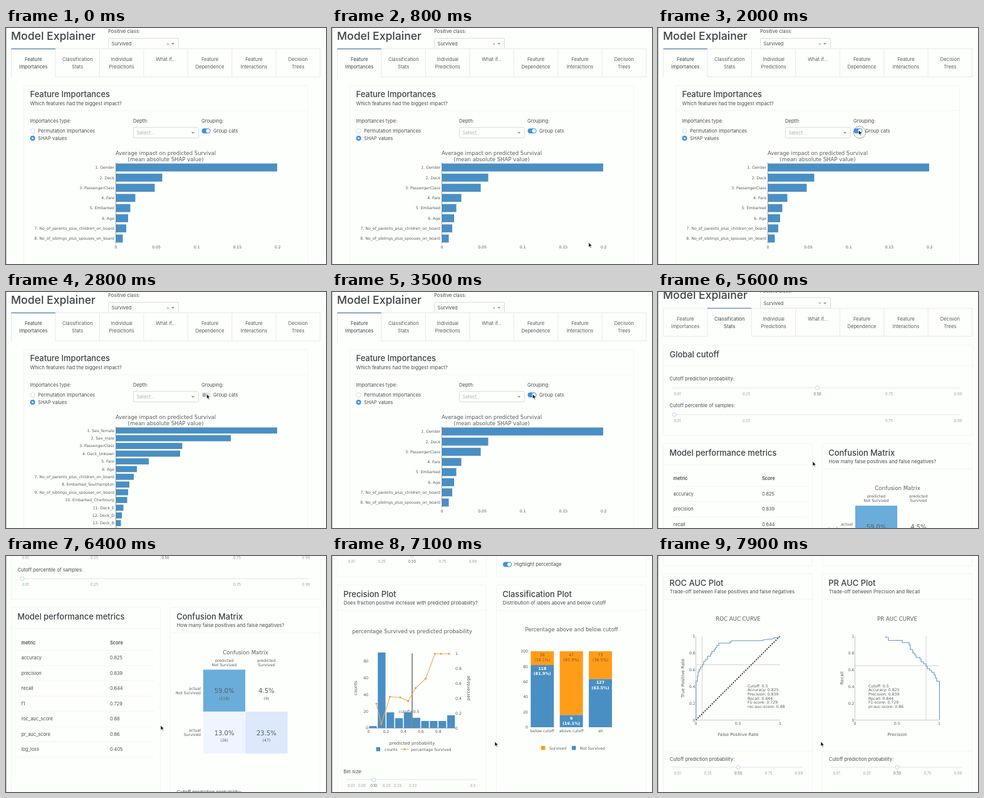
These frames come from a looping animation (511 by 379 pixels, 8 s). An HTML page:

```html
<!DOCTYPE html>
<html lang="en">
<head>
<meta charset="utf-8">
<title>Model Explainer</title>
<style>
html, body { margin: 0; width: 100%; height: 100%; overflow: hidden; background: #fdfffc; }
svg { display: block; width: 511px; height: 379px; }
text { font: 7.65px Inter, sans-serif; fill: #4a4d50; white-space: pre; }
.plot { font-family: "DejaVu Sans", sans-serif; fill: #5a5d60; }
</style>
</head>
<body>
<svg id="stage" viewBox="0 0 511 379"></svg>
<script>
const BLUE = '#4a8fc3', ORANGE = '#ff9d18', ACCENT = '#3f92e4', LINE = '#f3f5f3', PAPER = '#fdfffc';
const AXIS = '#c3c6c5', CROSS = '#cbcecd', CURVE = '#6b93b8', INK = '#3d4044';
const DURATION = 8000;
const stage = document.getElementById('stage');

function el(parent, tag, attrs = {}) {
  const node = document.createElementNS('http://www.w3.org/2000/svg', tag);
  for (const key in attrs) node.setAttribute(key, attrs[key]);
  parent.appendChild(node);
  return node;
}
const group = (parent, dy = 0) => el(parent, 'g', { transform: `translate(0 ${dy})` });
const rect = (g, x, y, width, height, fill, more) => el(g, 'rect', { x, y, width, height, fill, ...more });
const path = (g, d, stroke, width = 1, more) =>
  el(g, 'path', { d, stroke, 'stroke-width': width, fill: 'none', ...more });
const hline = (g, x1, x2, y, stroke = LINE, width = 1) => path(g, `M${x1} ${y}H${x2}`, stroke, width);
const vline = (g, x, y1, y2, stroke = LINE, width = 1) => path(g, `M${x} ${y1}V${y2}`, stroke, width);
const circle = (g, cx, cy, r, fill, stroke = 'none') => el(g, 'circle', { cx, cy, r, fill, stroke });

// y is the visual middle of the line of text.
function text(g, x, y, content, { size = 7.65, anchor = 'start', weight = 400, fill, plot, turn } = {}) {
  const node = el(g, 'text', { x, y: y + size * 0.355, 'text-anchor': anchor });
  node.style.fontSize = size + 'px';
  node.style.fontWeight = weight;
  if (fill) node.style.fill = fill;
  if (plot) node.setAttribute('class', 'plot');
  if (turn) node.setAttribute('transform', `rotate(-90 ${x} ${y})`);
  node.textContent = content;
  return node;
}
const plotText = (g, x, y, content, size = 6.2, anchor = 'middle', more) =>
  text(g, x, y, content, { size, anchor, plot: true, ...more });
const heading = (g, x, y, content) => text(g, x, y, content, { size: 12.9, weight: 500, fill: INK });
const subheading = (g, x, y, content) => text(g, x, y, content, { size: 7.8 });

function card(g, x, y, width, height, headerHeight) {
  rect(g, x + .5, y + .5, width, height, PAPER, { stroke: LINE });
  if (headerHeight) hline(g, x, x + width, y + headerHeight + .5);
}

function titledCard(g, x, y, height, title, subtitle) {
  card(g, x, y, x < 100 ? 238 : 239, height, subtitle ? 41 : 34);
  heading(g, x + 10.3, y + 15.4, title);
  if (subtitle) subheading(g, x + 10.8, y + 29.7, subtitle);
}

function select(g, x, y, width, value, filled) {
  rect(g, x + .5, y + .5, width, 17, PAPER, { stroke: '#d9dcdb', rx: 2 });
  text(g, x + 5.5, y + 9.2, value, { fill: filled ? '#4a4d50' : '#b2b5b6' });
  if (filled) text(g, x + width - 19, y + 9, '×', { fill: '#999' });
  el(g, 'path', { d: `M${x + width - 11} ${y + 8}h5l-2.5 3z`, fill: '#999' });
}

function toggle(g, x, y) {
  const track = rect(g, x, y - 4, 14, 8, ACCENT, { rx: 4 });
  const knob = circle(g, x + 10, y, 3, '#fff');
  return on => {
    track.setAttribute('fill', on ? ACCENT : '#dfe3e6');
    knob.setAttribute('cx', x + (on ? 10 : 4));
    knob.setAttribute('fill', on ? '#fff' : '#a9afb4');
  };
}

function slider(g, x1, x2, y, knobX, marks) {
  hline(g, x1, x2, y, '#e8eeee', 1.4);
  for (const [x, label] of marks) {
    const active = Math.abs(x - knobX) < 2;
    text(g, x, y + 9.7, label, { size: 5.8, anchor: 'middle', fill: active ? '#666' : '#9b9e9f' });
  }
  circle(g, knobX, y, 3, PAPER, '#b3dceb');
}

function cutoffSlider(g, x, y) {
  text(g, x + 10.8, y, 'Cutoff prediction probability:');
  const labels = ['0.01', '0.25', '0.50', '0.75', '0.99'];
  slider(g, x + 14, x + 223, y + 13.2, x + 120,
    labels.map((label, i) => [x + 23.3 + i * 48.4, label]));
}

const tabs = ['Feature Importances', 'Classification Stats', 'Individual Predictions', 'What if...',
  'Feature Dependence', 'Feature Interactions', 'Decision Trees'];

function header(g, active) {
  text(g, 8, 12.5, 'Model Explainer', { size: 17.6, weight: 500, fill: INK });
  text(g, 163, 5.5, 'Positive class:');
  select(g, 163, 16, 112, 'Survived', true);
  const step = 70.45, edge = '#e6e9e7';
  rect(g, 8.5, 33.5, step * 7, 45, PAPER, { stroke: edge });
  tabs.forEach((name, i) => {
    const x = 8.5 + i * step;
    if (i) vline(g, x, 33.5, 78.5, edge);
    if (i === active) {
      hline(g, x, x + step, 33.5, '#5f87b8', 1.3);
      hline(g, x + .5, x + step - .5, 78.5, PAPER, 1.6);
    }
    const words = name === 'What if...' ? [name] : name.split(' ');
    words.forEach((word, k) => text(g, x + step / 2, 50.3 + k * 12, word,
      { anchor: 'middle', fill: i === active ? INK : '#5a5d60' }));
  });
}

function barChart(g, top, step, height, bars) {
  bars.forEach(([name, width], i) => {
    const y = top + i * step;
    rect(g, 175.5, y - height / 2, width, height, BLUE);
    plotText(g, 173, y, `${i + 1}. ${name}`, 6.2, 'end');
  });
}

// ---- Importances page
const importances = group(stage);
header(importances, 0);
card(importances, 28, 92, 453, 400, 40);
heading(importances, 38.5, 106, 'Feature Importances');
subheading(importances, 38.5, 121.7, 'Which features had the biggest impact?');
text(importances, 38.5, 149, 'Importances type:');
circle(importances, 42.5, 165.3, 3.6, PAPER, '#d9dcdb');
text(importances, 51, 165.3, 'Permutation Importances');
circle(importances, 42.5, 177, 4, ACCENT);
circle(importances, 42.5, 177, 1.5, '#fff');
text(importances, 51, 177, 'SHAP values');
text(importances, 203, 149, 'Depth:');
select(importances, 203, 159, 104, 'Select...', false);
text(importances, 312, 149, 'Grouping:');
const setGrouping = toggle(importances, 312.5, 165.3);
text(importances, 331, 165.3, 'Group cats');
plotText(importances, 255, 200.5, 'Average impact on predicted Survival', 8.5);
plotText(importances, 255, 211.3, '(mean absolute SHAP value)', 8.5);

const parents = 'No_of_parents_plus_children_on_board';
const siblings = 'No_of_siblings_plus_spouses_on_board';
const grouped = group(importances), ungrouped = group(importances);
barChart(grouped, 224, 16.3, 12.8, [['Gender', 257.5], ['Deck', 74], ['PassengerClass', 62], ['Fare', 31],
  ['Embarked', 23], ['Age', 19.5], [parents, 16.5], [siblings, 11]]);
vline(grouped, 175.5, 216, 346, '#777', .7);
['0', '0.05', '0.1', '0.15', '0.2'].forEach((label, i) => plotText(grouped, 175.5 + i * 64.6, 352, label));
barChart(ungrouped, 222.4, 12.4, 9.8, [['Sex_female', 257.5], ['Sex_male', 183.5], ['PassengerClass', 106],
  ['Deck_Unkown', 102.5], ['Fare', 52.5], ['Age', 33.5], [parents, 28.5], ['Embarked_Southampton', 21.5],
  [siblings, 19.5], ['Embarked_Cherbourg', 18], ['Deck_E', 12], ['Deck_D', 9.5], ['Deck_B', 8], ['Deck_C', 6]]);
vline(ungrouped, 175.5, 216, 379, '#777', .7);

// ---- Stats page, in three screens stacked by scroll offset
const STOPS = [168, 579, 1019];
const stats = group(stage);
header(stats, 1);
const [metrics, precision, curves] = STOPS.map(offset => group(stats, offset));

card(metrics, 8, -76, 494, 145, 33);
heading(metrics, 18.5, -60, 'Global cutoff');
text(metrics, 18.5, -21, 'Cutoff prediction probability:');
const wide = [[31, '0.01'], [141, '0.25'], [254.5, '0.50'], [369, '0.75'], [479, '0.99']];
slider(metrics, 22, 482, -6.8, 254.5, wide);
text(metrics, 18.5, 22, 'Cutoff percentile of samples:');
slider(metrics, 22, 482, 36.2, 26, wide.filter(([, label]) => label !== '0.50'));

titledCard(metrics, 8, 82, 362, 'Model performance metrics');
[['metric', 'Score'], ['accuracy', '0.825'], ['precision', '0.839'], ['recall', '0.644'], ['f1', '0.729'],
  ['roc_auc_score', '0.88'], ['pr_auc_score', '0.86'], ['log_loss', '0.405']].forEach((row, i) => {
  const y = 139 + i * 24.5, style = { size: 7.4, weight: i ? 400 : 600 };
  text(metrics, 24.5, y, row[0], style);
  text(metrics, 166, y, row[1], style);
  hline(metrics, 19, 237, y + 12.5);
});
cutoffSlider(metrics, 8, 397);

titledCard(metrics, 262, 82, 362, 'Confusion Matrix', 'How many false positives and false negatives?');
plotText(metrics, 382.5, 154.5, 'Confusion Matrix', 8.6);
[['59.0%', '(118)', '#6aaddb'], ['4.5%', '(9)', PAPER], ['13.0%', '(26)', '#eef5fe'], ['23.5%', '(47)', '#dde8fb']]
  .forEach(([share, count, fill], i) => {
    const x = 315 + i % 2 * 67.3, y = 182.5 + (i >> 1) * 67.4;
    rect(metrics, x, y, 67.3, 67.4, fill);
    plotText(metrics, x + 33.6, y + 34.2, share, 10);
    plotText(metrics, x + 33.6, y + 46, count);
  });
['Not Survived', 'Survived'].forEach((label, i) => {
  plotText(metrics, 348.6 + i * 67.3, 167.3, 'predicted');
  plotText(metrics, 348.6 + i * 67.3, 174.5, label);
  plotText(metrics, 311, 212.5 + i * 67.4, 'actual', 6.2, 'end');
  plotText(metrics, 311, 219.7 + i * 67.4, label, 6.2, 'end');
});
cutoffSlider(metrics, 262, 379.5);
toggle(metrics, 273, 424.5);
text(metrics, 291, 424.5, 'Highlight percentage');

titledCard(precision, 8, 46, 409, 'Precision Plot', 'Does fraction positive increase with predicted probability?');
plotText(precision, 128, 120.5, 'percentage Survived vs predicted probability', 8.5);
[2.5, 91, 19, 12, 19, 12.5, 8.7, 8.7, 8.7, 15.5].forEach((count, i) => {
  const height = count * 1.335;
  rect(precision, 59.3 + i * 13.85, 276.5 - height, 12.3, height, BLUE);
});
for (let i = 0; i < 5; i++) {
  plotText(precision, 58, 276 - i * 26.7, String(i * 20), 6.2, 'end');
  plotText(precision, 58.5 + i * 27.8, 281.5, i ? `0.${i * 2}` : '0');
}
for (let i = 0; i < 6; i++)
  plotText(precision, 197, 276.5 - i * 23.9, i % 5 ? `0.${i * 2}` : String(i / 5), 6.2, 'start');
hline(precision, 58.5, 197, 276.5, '#999', .7);
plotText(precision, 123, 250, 'cutoff=0.5');
vline(precision, 128, 156.5, 276.5, '#55585a', 1.3);
const share = [[71, 237], [78.5, 270], [92.5, 226], [109, 227], [121.5, 233], [133.5, 212], [149.5, 197],
  [164.5, 157], [174, 157], [187, 157]];
path(precision, 'M' + share.join('L'), '#f2a552', 1.1);
share.forEach(([x, y]) => circle(precision, x, y, 1.6, '#f09a3e'));
plotText(precision, 38, 212, 'counts', 7, 'middle', { turn: true });
plotText(precision, 218, 212, 'percentage', 7, 'middle', { turn: true });
plotText(precision, 128, 300.5, 'predicted probability', 7);
rect(precision, 70.5, 307, 6.5, 6.5, BLUE);
plotText(precision, 84, 310.3, 'counts', 6.2, 'start');
hline(precision, 109.5, 123, 310.3, '#f2a552', 1.1);
circle(precision, 116, 310.3, 1.6, '#f09a3e');
plotText(precision, 126, 310.3, 'percentage Survived', 6.2, 'start');
text(precision, 18.5, 346, 'Bin size:');
slider(precision, 22, 232, 359.3, 66.5, [[30.5, '0.01'], [48, '0.05'], [66.5, '0.10'], [87, '0.20'],
  [105, '0.25'], [129, '0.33'], [225, '0.5']]);
cutoffSlider(precision, 8, 412);

titledCard(precision, 262, 46, 409, 'Classification Plot', 'Distribution of labels above and below cutoff');
plotText(precision, 382.5, 118.5, 'Percentage above and below cutoff', 8.4);
for (let i = 0; i < 6; i++) plotText(precision, 313, 275 - i * 24.4, String(i * 20), 6.2, 'end');
[['below cutoff', 81.9, 118, 26], ['above cutoff', 16.1, 9, 47], ['all', 63.5, 127, 73]]
  .forEach(([label, percent, lost, saved], i) => {
    const x = 317.3 + i * 46.4, mid = x + 18.5, edge = 275 - percent * 1.22;
    rect(precision, x, 153, 37, edge - 153, ORANGE);
    rect(precision, x, edge, 37, 275 - edge, BLUE);
    const dark = { fill: '#80591f' }, light = { fill: '#fff', weight: 700 };
    plotText(precision, mid, 158.5, saved, 6.4, 'middle', dark);
    plotText(precision, mid, 166.5, `(${(100 - percent).toFixed(1)}%)`, 6.4, 'middle', dark);
    plotText(precision, mid, edge + 5.5, lost, 6.4, 'middle', light);
    plotText(precision, mid, edge + 13.8, `(${percent}%)`, 6.4, 'middle', light);
    plotText(precision, mid, 280.5, label);
  });
rect(precision, 334, 305, 6.5, 6.5, ORANGE);
plotText(precision, 347, 308.3, 'Survived', 6.2, 'start');
rect(precision, 383, 305, 6.5, 6.5, BLUE);
plotText(precision, 396, 308.3, 'Not Survived', 6.2, 'start');
cutoffSlider(precision, 262, 412);

function curveCard(x, title, subtitle, chart, xName, yName, crossX, crossY, score, textX) {
  const left = x + 52.5, right = left + 134.5;
  titledCard(curves, x, 28, 372, title, subtitle);
  hline(curves, x, x + 239, 313.5);
  plotText(curves, x + 120, 100.5, chart, 8.6);
  path(curves, `M${left} 128.5V263.5H${right}`, AXIS, .9);
  vline(curves, crossX, 128.5, 263.5, CROSS, .9);
  hline(curves, left, right, crossY, CROSS, .9);
  for (let i = 0; i < 6; i++)
    plotText(curves, left - 1, 263.5 - i * 27, i % 5 ? `0.${i * 2}` : String(i / 5), 6.2, 'end');
  ['0', '0.5', '1'].forEach((label, i) => plotText(curves, left + i * 67.2, 268.5, label));
  plotText(curves, x + 120, 287, xName, 7);
  plotText(curves, x + 32, 196, yName, 7, 'middle', { turn: true });
  ['Cutoff: 0.5', 'Accuracy: 0.825', 'Precision: 0.839', 'Recall: 0.644', 'F1-score: 0.729', score]
    .forEach((line, i) => plotText(curves, textX, 208.3 + i * 6.7, line, 6.2, 'start'));
  cutoffSlider(curves, x, 326);
}
const steps = points => points.map(([x, y], i) => i ? `H${x}V${y}` : `M${x} ${y}`).join('');

curveCard(8, 'ROC AUC Plot', 'Trade-off between False positives and false negatives', 'ROC AUC CURVE',
  'False Positive Rate', 'True Positive Rate', 70.5, 174.7, 'roc-auc-score: 0.88', 143);
path(curves, 'M60.5 263.5L195 128.5', '#333', 1.9, { 'stroke-dasharray': '2 2' });
path(curves, steps([[60.5, 263], [60.7, 201], [63, 193], [64, 186], [66, 182], [68, 178], [71, 174], [73, 169],
  [76, 166], [79, 161], [84, 157], [86, 153], [90, 150], [92, 147], [94, 143.5], [97, 140], [115, 138],
  [117, 136]]) + 'H165L170 134.5L183 133L186 131.5L193 130.5L195 128.5', CURVE, 1.1);

curveCard(262, 'PR AUC Plot', 'Trade-off between Precision and Recall', 'PR AUC CURVE',
  'Precision', 'Recall', 428, 176.3, 'pr-auc-score: 0.86', 336);
path(curves, steps([[364, 128.5], [364, 131], [368, 135.5], [390, 139], [401, 143], [403, 150], [406, 152],
  [407, 156], [410, 159], [412, 163], [418, 165], [420, 170], [424, 173], [428, 177], [430, 181], [434, 184],
  [437, 187], [441, 191], [443, 196], [445, 201], [449.5, 263]]), CURVE, 1.1);

// ---- Pointer and window edge
vline(stage, .5, 0, 379, '#c4c7c6');
const ring = el(stage, 'circle', { r: 9.5, fill: 'none', stroke: '#333', 'stroke-dasharray': '1.5 1.5' });
const cursor = el(stage, 'g');
const arrow = el(cursor, 'path', { d: 'M0 0V7.6L1.8 6L3 8.8L4.2 8.3L3 5.6H5.4Z',
  fill: '#111', stroke: '#fff', 'stroke-width': .6 });
const hand = el(cursor, 'path', { d: 'M-.8 0q.8-.8 1.6 0V3.2L4 4V7L3 9.6H-1.2L-3.4 6L-2.6 5.2L-.8 6.4Z',
  fill: '#fff', stroke: '#333', 'stroke-width': .7 });

// Keys are [time, ...values], eased between neighbours.
function track(keys, t) {
  const next = keys.findIndex(key => key[0] > t);
  if (next === 0) return keys[0].slice(1);
  if (next < 0) return keys[keys.length - 1].slice(1);
  const a = keys[next - 1], b = keys[next], p = (t - a[0]) / (b[0] - a[0]);
  const eased = p * p * (3 - 2 * p);
  return a.slice(1).map((value, i) => value + (b[i + 1] - value) * eased);
}
const pointerKeys = [[500, 430, 385], [1600, 320.5, 164], [3650, 320.5, 164], [4300, 121, 56],
  [4900, 121, 56], [5500, 247, 272], [6450, 247, 272], [7000, 260, 298]];
const scrollKeys = [[5500, 0], [6300, STOPS[0]], [6450, STOPS[0]], [7050, STOPS[1]], [7150, STOPS[1]],
  [7800, STOPS[2]]];
const clicks = [1950, 3150, 4550];
const show = (node, visible) => node.setAttribute('display', visible ? 'inline' : 'none');

function draw(t) {
  const onStats = t >= 4900, expanded = t >= 2800 && t < 3500;
  show(importances, !onStats);
  show(stats, onStats);
  show(grouped, !expanded);
  show(ungrouped, expanded);
  setGrouping(t < 2150 || t >= 3250);
  stats.setAttribute('transform', `translate(0 ${-track(scrollKeys, t)[0]})`);

  const [x, y] = track(pointerKeys, t);
  const onTab = t >= 4200 && t < 5000;
  cursor.setAttribute('transform', `translate(${x} ${y})`);
  show(cursor, t >= 500);
  show(arrow, !onTab);
  show(hand, onTab);
  ring.setAttribute('cx', x + 1.5);
  ring.setAttribute('cy', y + 3.5);
  show(ring, clicks.some(start => t >= start && t < start + 200));
}

function frame() {
  draw(performance.now() % DURATION);
  requestAnimationFrame(frame);
}
frame();
</script>
</body>
</html>
```
